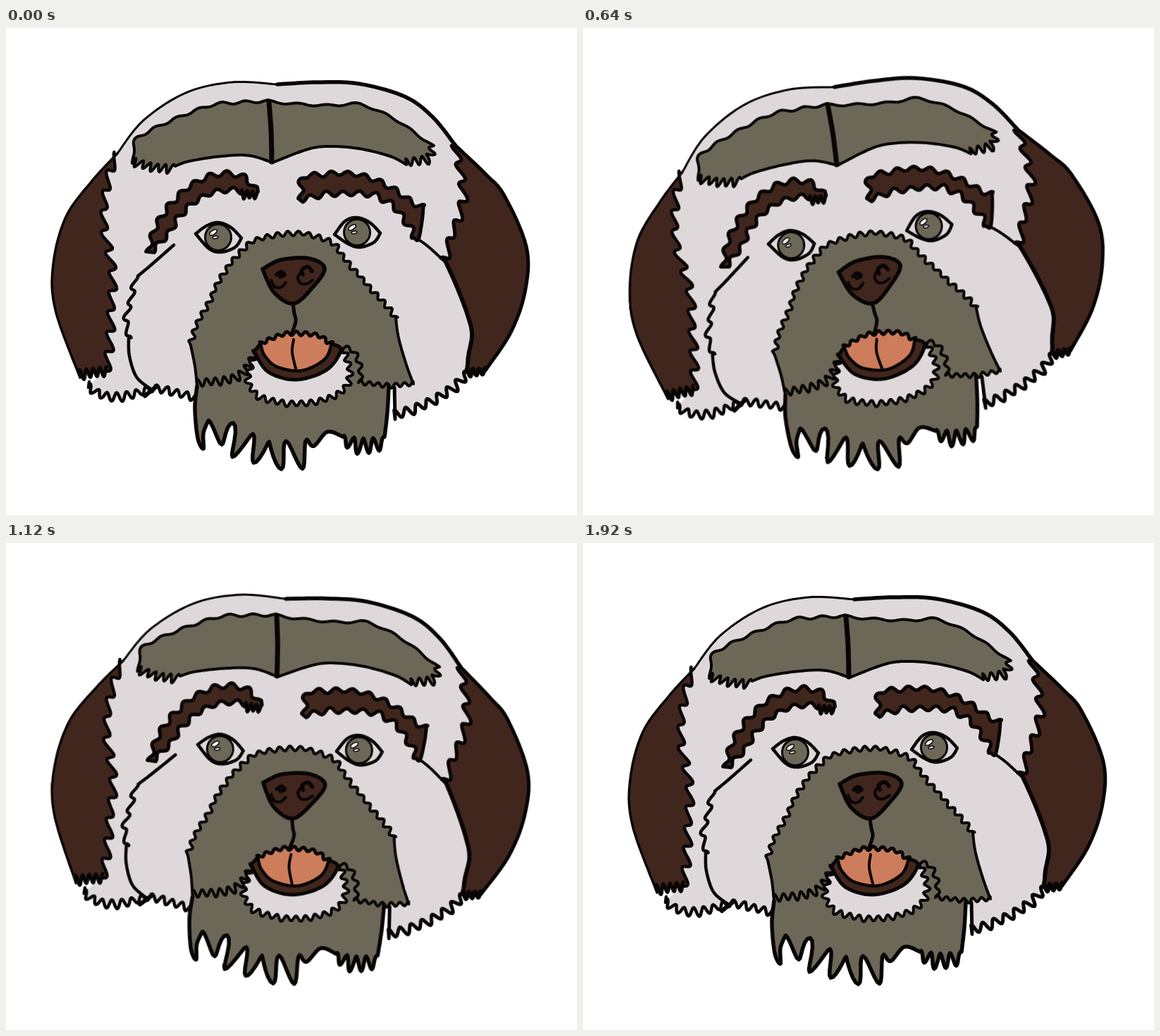
An HTML page for the animation above (2080 ms loop, 810 by 691 pixels).

```html
<!DOCTYPE html>
<html lang="en">
<head>
<meta charset="utf-8">
<title>Dog tilting its head</title>
<style>
  html, body { margin: 0; width: 100%; height: 100%; overflow: hidden; background: #fff; }
  svg { display: block; width: 100%; height: 100%; }
  #head { transform-origin: 408px 358px; stroke: #080605; stroke-linejoin: round; stroke-linecap: round; }
</style>
</head>
<body>
<svg viewBox="0 0 810 691"><g id="head"></g></svg>
<script>
const FUR = '#dfd8db', GREY = '#6d6757', BROWN = '#41261d', TONGUE = '#cd7d5c';
const head = document.getElementById('head');

let seed = 7;
const random = () => {
  const v = Math.sin(++seed * 12.9898) * 43758.5453;
  return v - Math.floor(v);
};

// Smooth line through a few "x,y" key points, as a dense list of points.
function curve(keys, steps = 12) {
  const p = keys.split(' ').map(key => key.split(',').map(Number));
  const last = p.length - 1, out = [p[0]];
  for (let i = 0; i < last; i++) {
    const [a, b, c, d] = [p[Math.max(0, i - 1)], p[i], p[i + 1], p[Math.min(last, i + 2)]];
    for (let s = 1; s <= steps; s++) {
      const t = s / steps;
      out.push([0, 1].map(k => b[k] + t / 2 * (c[k] - a[k]
        + t * (2 * a[k] - 5 * b[k] + 4 * c[k] - d[k] + t * (3 * (b[k] - c[k]) + d[k] - a[k])))));
    }
  }
  return out;
}

// Waves the curve into tufts; tips lie to the right of travel when depth > 0
// and lean that many pixels along it.
function fur(keys, teeth, depth, lean = 0) {
  const base = curve(keys), lengths = [0], steps = 12, out = [];
  for (let i = 1; i < base.length; i++) {
    lengths.push(lengths[i - 1] + Math.hypot(base[i][0] - base[i - 1][0], base[i][1] - base[i - 1][1]));
  }
  const total = lengths[base.length - 1];
  let reach = 1, i = 1;
  for (let n = 0; n <= teeth * steps; n++) {
    if (n % steps === 0) reach = 0.8 + 0.4 * random();
    const s = total * n / (teeth * steps);
    while (i < base.length - 1 && lengths[i] < s) i++;
    const [ax, ay] = base[i - 1], [bx, by] = base[i];
    const span = lengths[i] - lengths[i - 1], t = (s - lengths[i - 1]) / span;
    const ux = (bx - ax) / span, uy = (by - ay) / span;
    const lift = (1 - Math.cos(2 * Math.PI * n / steps)) / 2 * reach;
    const out1 = depth * (lift - 0.5), along = lean * lift;
    out.push([ax + (bx - ax) * t - uy * out1 + ux * along, ay + (by - ay) * t + ux * out1 + uy * along]);
  }
  return out;
}

function add(tag, attrs) {
  const el = document.createElementNS('http://www.w3.org/2000/svg', tag);
  for (const name in attrs) el.setAttribute(name, attrs[name]);
  head.append(el);
}
const trace = points => 'M' + points.map(p => p.map(v => v.toFixed(1))).join('L');
const fill = (color, ...parts) => add('path', { d: trace(parts.flat()) + 'Z', fill: color, stroke: 'none' });
const line = (width, ...parts) => add('path', { d: trace(parts.flat()), fill: 'none', 'stroke-width': width });
const shape = (color, width, ...parts) =>
  add('path', { d: trace(parts.flat()) + 'Z', fill: color, 'stroke-width': width });

// Skull and ears
const crownLeft = curve('158,178 195,131 255,92 320,77 385,80');
const crownRight = curve('385,80 440,77 500,79 565,97 605,126 637,166');
const rightFur = fur('637,166 645,205 648,240 640,275 629,305 622,328', 6, -10, 8);
const rightCheek = curve('622,328 640,368 655,408 661,435 656,465 654,488');
const rightFringe = fur('654,492 632,512 605,529 575,542 552,548', 7, -12);
const leftFringe = fur('270,525 240,518 213,512 175,521 140,522 117,510', 11, -11);
const leftFur = fur('143,490 147,440 149,400 151,345 140,290 141,240 147,205 158,178', 11, 10, -8);
const leftEar = curve('158,178 122,217 85,268 67,335 70,400 105,496');
const leftTuft = fur('105,492 143,488', 4, 14);
const rightEar = curve('680,486 717,430 737,370 738,310 707,238 680,207 637,166');
const rightTuft = fur('654,489 680,487', 3, 9);

fill(FUR, crownLeft, crownRight, rightFur, rightCheek, rightFringe, curve('551,510 500,480 300,480 300,520'), leftFringe, leftFur);
fill(BROWN, leftFur, leftEar, leftTuft);
fill(BROWN, rightFur, rightCheek, rightTuft, rightEar);
line(3, crownLeft);
line(5.5, crownRight);
line(4.5, leftFur);
line(3.5, leftEar);
line(5, leftTuft);
line(5, rightFur);
line(6, rightCheek);
line(6, rightTuft);
line(5, rightEar);
line(5, rightFringe, curve('552,555 551,510'));
line(4.5, leftFringe, curve('117,510 118,502'));

// Cheeks
line(4.5, curve('238,308 205,337 187,352'), fur('184,352 177,385 170,412 174,440', 4, 7, 6), curve('174,440 175,465 185,495 205,512'));
line(4, curve('585,300 600,311 624,333'));
line(6, curve('197,522 212,510'));

// Forehead patch
shape(GREY, 4,
  fur('181,192 181,172 187,155 216,140 262,120 300,108 345,105 373,104', 7, 4),
  fur('373,104 400,107 460,110 500,108 545,126 580,149 606,168', 6, 3),
  fur('606,172 598,186 568,192', 4, -13),
  curve('568,194 545,182 500,171 455,168 425,173 378,191'),
  curve('378,191 345,181 305,182 260,189 240,196'),
  fur('238,200 210,199 182,191', 5, -13, 4));
line(7, curve('373,105 376,145 377,190'));

// Eyebrows
shape(BROWN, 5,
  fur('202,318 211,285 232,251 265,222 300,207 335,210 354,228', 9, 7),
  fur('357,238 334,236', 3, -12),
  fur('334,232 300,231 268,246 245,270 230,292 208,316', 7, 7));
shape(BROWN, 5,
  fur('418,242 420,214 445,208 485,207 520,214 552,230 570,243 592,254', 9, 7),
  curve('592,254 590,275 585,300 579,298'),
  fur('579,296 570,280 555,258 530,241 500,234 455,236 420,243', 8, 8));

// Eyes
function eye(x, y, tilt) {
  const at = keys => curve(keys).map(([dx, dy]) => [x + dx, y + dy]);
  shape(FUR, 4.5, at(`-32,${tilt} -17,-16 0,-21 18,-14 33,1`), at(`33,1 24,14 4,21 -13,16 -32,${tilt}`));
  add('circle', { cx: x, cy: y, r: 18.5, fill: GREY, 'stroke-width': 3 });
  const glint = (dx, dy, rx, ry, turn) => add('ellipse', {
    rx, ry, fill: '#fff', 'stroke-width': 1.5, transform: `translate(${x + dx} ${y + dy}) rotate(${turn})`
  });
  glint(-7, -7, 6, 2.8, -35);
  glint(-4, 0, 4, 1.8, -12);
}
eye(301, 297, -5);
eye(498, 290, 3);

// Muzzle and beard
const muzzle = [
  curve('271,508 268,480 262,450'),
  fur('262,445 272,418 290,385 306,352 335,315 360,299 412,291 461,303 478,324 510,362 543,397 553,412', 29, 6),
  curve('553,412 557,440 568,478 578,505')
].flat();
const lipRight = [
  fur('578,505 540,507 503,503', 6, -6),
  fur('503,503 502,480 492,458 476,453', 4, 6)
].flat();
const lipLeft = fur('355,460 338,487 315,499 272,504', 8, -11);
const beard = [
  curve('271,508 268,540 272,582 280,597 280,575 287,557'),
  fur('287,575 315,577 342,592 370,605 400,604 428,602', 5, 36, 5),
  curve('428,585 437,593 456,573 478,580'),
  fur('478,588 505,592 536,590', 4, 19),
  curve('537,580 541,545 543,508')
].flat();

fill(GREY, beard, muzzle.slice().reverse());
fill(GREY, muzzle, lipRight, lipLeft);
line(5.5, beard);
line(4, muzzle);
line(4, lipRight);
line(4, lipLeft);

// Chin and mouth
shape(FUR, 4, fur('352,468 343,500 360,523 405,533 450,528 480,512 488,485 478,458', 18, 8), curve('478,458 440,470 385,470 352,468'));
const tongueTop = fur('361,448 372,443 390,436 407,433 440,436 462,448', 8, 5);
shape(BROWN, 5, curve('352,459 361,448'), tongueTop, curve('462,448 475,457 455,485 412,499 372,488 352,459'));
shape(TONGUE, 4.5, tongueTop, curve('462,448 452,470 420,486 385,481 367,465 361,448'));
line(4, curve('408,442 406,460 411,483'));
line(5, curve('407,391 409,405 411,416 406,432'));

// Nose
shape(BROWN, 5.5, curve('364,342 390,329 430,327 452,341 435,368 408,391 380,375 364,342'));
line(5.5, curve('384,350 390,346 395,350 389,353'));
line(4, curve('376,358 381,367 390,368 397,361'));
line(5.5, curve('434,345 428,339 420,343 421,350'));
line(4, curve('419,345 414,354 418,362 426,363 435,358'));

// Held poses: three equal steps out and back on each side.
const poseCount = 13;
function tilt(i) {
  const step = i % poseCount;
  return step <= 6 ? -2.93 * (3 - Math.abs(3 - step)) : 2.5 * (3 - Math.abs(9 - step));
}
const poses = Array.from({ length: poseCount + 1 }, (_, i) => ({
  transform: `rotate(${tilt(i)}deg)`, offset: i / poseCount, easing: 'step-end'
}));
head.animate(poses, { duration: 160 * poseCount, iterations: Infinity });
</script>
</body>
</html>
```
